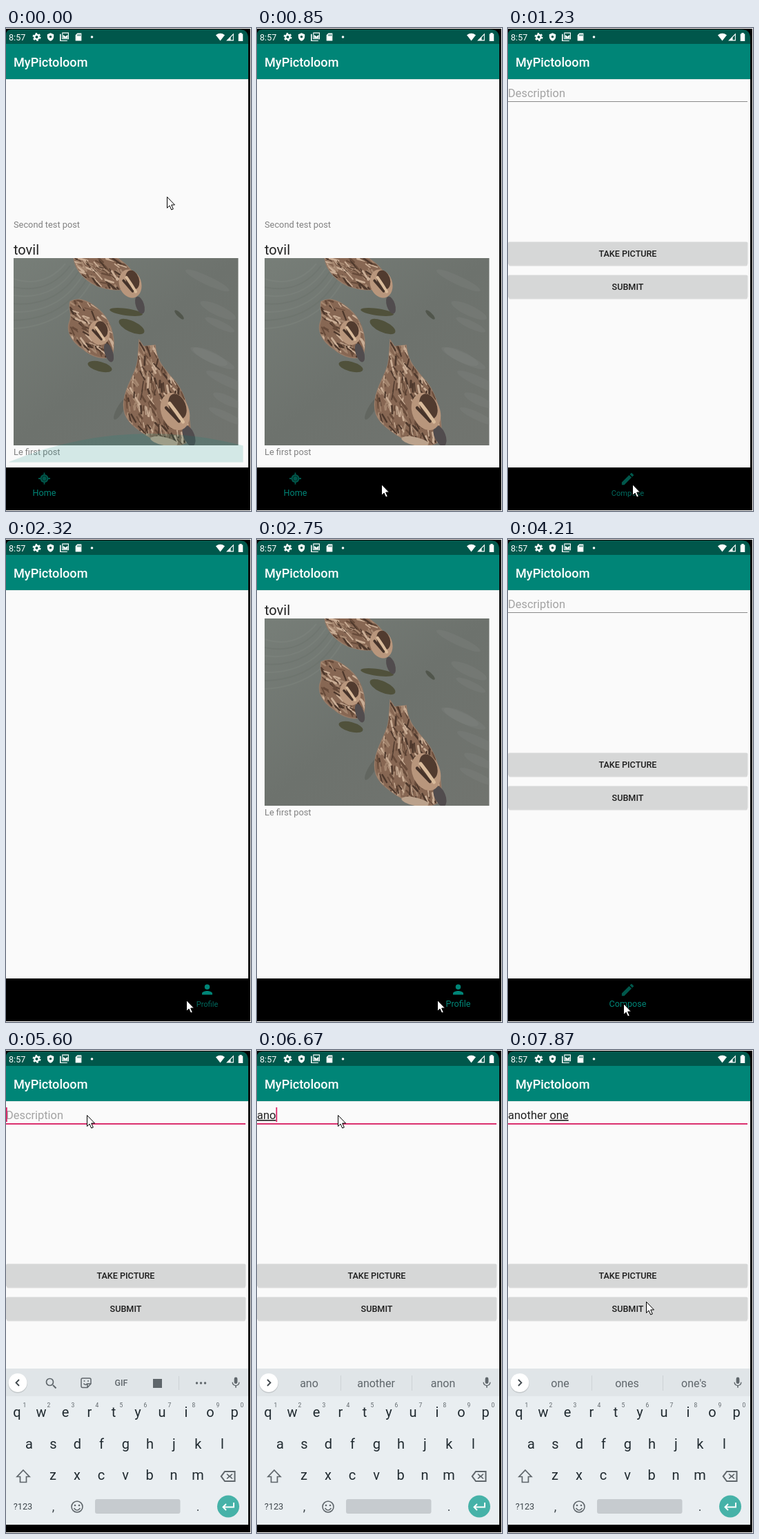
An HTML page that plays this animation: 355 by 699 pixels, repeating every 8 s.

```html
<!DOCTYPE html>
<html lang="en">
<head>
<meta charset="utf-8">
<title>Photo app demo</title>
<style>
html, body { margin: 0; width: 100%; height: 100%; overflow: hidden; background: #fff; }
svg { display: block; width: 100%; height: 100%; }
text { font-family: Roboto, Arial, sans-serif; white-space: pre; }
.mid { text-anchor: middle; }
.med { font-weight: 500; }
.word { text-decoration: underline; text-decoration-thickness: 1px; }
</style>
</head>
<body>
<svg id="stage" viewBox="0 0 355 699" xmlns="http://www.w3.org/2000/svg"></svg>
<script>
const LOOP = 8000, TEAL = '#008577', DARK = '#00574b', PINK = '#d81b60', GREY = '#5f666b';
const stage = document.getElementById('stage');

const text = (s, x, y, size, fill, cls = '', id = '') =>
  `<text id="${id}" class="${cls}" x="${x}" y="${y}" font-size="${size}" fill="${fill}">${s}</text>`;
const rect = (x, y, w, h, fill, more = '') =>
  `<rect x="${x}" y="${y}" width="${w}" height="${h}" fill="${fill}" ${more}/>`;
const oval = (x, y, rx, ry, fill, turn = 0, alpha = 1) =>
  `<ellipse rx="${rx}" ry="${ry}" fill="${fill}" opacity="${alpha}" transform="translate(${x} ${y}) rotate(${turn})"/>`;
const line = (d, color, w = 1, more = '') =>
  `<path d="${d}" fill="none" stroke="${color}" stroke-width="${w}" ${more}/>`;
// Icons are drawn on a 24 unit grid and centred on x, y.
const icon = (d, x, y, size, fill) =>
  `<path d="${d}" fill="${fill}" fill-rule="evenodd" transform="translate(${x - size / 2} ${y - size / 2}) scale(${size / 24})"/>`;
const group = (id, body) => `<g id="${id}">${body}</g>`;

let seed = 7;
const rand = () => (seed = (seed * 16807) % 2147483647) / 2147483647;

const ICONS = {
  shield: 'M12 1L21 5V11C21 17 17 21.500 12 23C7 21.500 3 17 3 11V5ZM12 8A3.500 3.500 0 1 0 12 15A3.500 3.500 0 1 0 12 8Z',
  stack: 'M6 1H24V19H6ZM8 3V17H22V3ZM0 5H3V22H20V24H0ZM9 16V7L15 12L21 7V16Z',
  card: 'M9 2H20V22H4V7ZM9 5V9H11V5ZM12.500 5V9H14.500V5ZM16 5V9H18V5Z',
  wifi: 'M0 7Q12-2 24 7L12 22Z',
  signal: 'M2 22L22 2V22ZM14 20H20V7L14 13Z',
  battery: 'M9 1H15V3.500H18V23H6V3.500H9Z',
  pencil: 'M3 17.250V21H6.750L17.800 9.940L14.060 6.190ZM20.700 7.040A1 1 0 0 0 20.700 5.630L18.370 3.290A1 1 0 0 0 16.960 3.290L15.130 5.120L18.880 8.870Z',
  person: 'M12 12A4 4 0 1 0 12 4A4 4 0 1 0 12 12ZM12 14C9.300 14 4 15.300 4 18V20H20V18C20 15.300 14.700 14 12 14Z',
  mic: 'M12 14A3 3 0 0 0 15 11V5A3 3 0 0 0 9 5V11A3 3 0 0 0 12 14ZM17.300 11A5.300 5.300 0 0 1 6.700 11H5A7 7 0 0 0 11 17.700V21H13V17.700A7 7 0 0 0 19 11Z',
  back: 'M7 4H23V20H7L1 12ZM8 6L3.500 12L8 18H21V6ZM11 8L14.500 11L18 8L19 9L16 12L19 15L18 16L14.500 13L11 16L10 15L13 12L10 9Z'
};

function duck(id, body, angle, box, head, bill) {
  const [x, y, w, h] = box;
  let down = '';
  for (let i = 0; i < w * h / 45; i++) {
    const a = (angle + (rand() - .5) * 60) * Math.PI / 180, len = 6 + rand() * 10;
    const px = x + rand() * w, py = y + rand() * h;
    down += line(`M${px.toFixed(1)} ${py.toFixed(1)}l${(Math.cos(a) * len).toFixed(1)} ${(Math.sin(a) * len).toFixed(1)}`,
      ['#4d382c', '#674b3a', '#a58770', '#c9ad95'][i % 4], 1.2 + rand() * 2);
  }
  const [hx, hy, rx, ry, turn] = head;
  return `<clipPath id="${id}"><path d="${body}"/></clipPath>
    <path d="${body}" fill="#876753" stroke="#977b67" stroke-width="1.500"/>
    <g clip-path="url(#${id})" stroke-linecap="round">${down}</g>
    ${oval(...bill.slice(0, 4), '#514c4e', bill[4])}
    <g transform="translate(${hx} ${hy}) rotate(${turn})" stroke-linecap="round">
      ${oval(0, 0, rx, ry, '#b8967c')}
      ${oval(rx * .3, -ry * .2, rx * .6, ry * .68, '#513b2f')}
      ${line(`M${-rx * .15} ${-ry * .5}Q${rx * .1} ${ry * .1} ${rx * .25} ${ry * .65}`, '#d9bb9b', rx * .25)}
      ${line(`M${-rx * .5} ${-ry * .35}Q${-rx * .25} ${ry * .1} 0 ${ry * .55}`, '#45332a', rx * .22)}
    </g>`;
}

function photo() {
  let water = '';
  for (let i = 0; i < 7; i++) {
    water += line(`M0 ${30 + i * 12}Q${45 + i * 6} ${44 + i * 9} ${75 + i * 7} ${8 + i * 3}`, i % 2 ? '#646a65' : '#858b86', 2, 'opacity=".3"');
  }
  for (let i = 0; i < 9; i++) {
    water += oval(190 + rand() * 130, 20 + rand() * 230, 20 + rand() * 22, 4 + rand() * 5, '#858783', 25, .25);
  }
  return `<linearGradient id="pond" x2="1" y2="1"><stop stop-color="#777e78"/><stop offset=".5" stop-color="#6d726d"/><stop offset="1" stop-color="#71746f"/></linearGradient>
    <clipPath id="frame">${rect(0, 0, 325.5, 271, '#000')}</clipPath>
    <g clip-path="url(#frame)">${rect(0, 0, 326, 271, 'url(#pond)')}${water}
    ${oval(163, 78, 24, 5, '#50513b', 8)}${oval(171, 99, 20, 8, '#50513b', 25)}${oval(125, 157, 18, 7, '#50513b', 15)}
    ${oval(240, 82, 9, 3, '#51564c', 45)}${oval(155, 218, 5, 18, '#626660', 30)}
    ${duck('d1', 'M87-2C88 17 107 38 130 43C148 48 169 47 174 35C178 20 160 6 147-2Z', 35, [80, -6, 92, 50], [169, 37, 16, 21, -18], [183, 68, 6, 13, -18])}
    ${duck('d2', 'M82 63C97 55 114 65 128 79C144 96 148 122 143 140C132 149 113 143 100 131C84 121 76 105 81 92C86 82 79 72 82 63Z', 45, [75, 56, 70, 88], [124, 108, 15, 18, -18], [138, 137, 6, 14, -18])}
    ${duck('d3', 'M182 119L188 128L205 126C207 148 216 158 229 173C246 190 257 216 256 262C239 280 210 268 192 256C174 244 156 232 160 206C163 182 178 168 180 147Z', 75, [155, 116, 102, 150], [234, 222, 20, 28, -22], [254, 257, 8, 16, -22])}
    ${oval(218, 265, 20, 6, '#bba28c', 12)}</g>`;
}

const button = (label, y) =>
  rect(1, y + 1.5, 346, 33.5, '#000', 'rx="2" opacity=".13"') + rect(0, y, 347.5, 33, '#d6d7d7', 'rx="2"') +
  text(label, 173.5, y + 21.5, 12.6, '#1c1c1c', 'mid med');

function keyboard() {
  let keys = '';
  const row = (letters, x, y) => [...letters].forEach((c, i) => {
    keys += text(c, x + i * 35, y, 20, '#202a30', 'mid');
  });
  row('qwertyuiop', 16, 531);
  row('asdfghjkl', 33.4, 577);
  row('zxcvbnm', 68, 622);
  [...'1234567890'].forEach((c, i) => { keys += text(c, 27 + i * 35, 517, 8.5, GREY, 'mid'); });
  const tools = line('M68 485L72.500 489.500', GREY, 2) + `<circle cx="63.500" cy="480.500" r="5" fill="none" stroke="${GREY}" stroke-width="1.700"/>` +
    line('M111 475H121Q123 475 123 477V483L118 488.500H111Q109 488.500 109 486.500V477Q109 475 111 475ZM123 483H118V488.500M112.500 482.500Q115 486 117.500 483', GREY, 1.5) +
    `<circle cx="113.500" cy="479" r="1" fill="${GREY}"/><circle cx="119" cy="479" r="1" fill="${GREY}"/>` +
    text('GIF', 167, 486, 12.5, GREY, 'mid med') + rect(213, 476, 13, 13, GREY) + rect(250, 472, 1, 20, '#cdd2d5') +
    [276.5, 282.5, 288.5].map(x => `<circle cx="${x}" cy="482" r="1.700" fill="${GREY}"/>`).join('');
  const words = rect(121, 471, 1, 22, '#cdd2d5') + rect(224, 471, 1, 22, '#cdd2d5') +
    [75.5, 172.5, 269.5].map((x, i) => text('', x, 488, 16, GREY, 'mid', 'hint' + i)).join('');
  return rect(0, 461, 351, 226, '#e9eef1') + rect(0, 461, 351, 40, '#e0e5e8') +
    '<circle cx="17" cy="482.500" r="14" opacity=".12"/><circle cx="17" cy="481.500" r="13.500" fill="#fff"/>' +
    line('', '#3f474c', 1.8, 'id="chevron"') + group('tools', tools) + group('words', words) + icon(ICONS.mic, 333, 481.5, 19, GREY) + keys +
    line('M25 608L34 617.500H29.500V625.500H20.500V617.500H16Z', GREY, 1.7) + icon(ICONS.back, 321.5, 617, 24, GREY) +
    text('?123', 24.5, 665, 12.8, '#3f474c', 'mid') + text(',', 68.5, 667, 18, '#3f474c', 'mid') + text('.', 278, 667, 18, '#3f474c', 'mid') +
    `<circle cx="103" cy="661" r="8" fill="none" stroke="${GREY}" stroke-width="1.600"/><circle cx="100" cy="659" r="1.300" fill="${GREY}"/><circle cx="106" cy="659" r="1.300" fill="${GREY}"/>` +
    line('M98.500 663Q103 669 107.500 663', GREY, 1.5) + rect(129, 650, 123.5, 21, '#c6cbcf', 'rx="3"') +
    '<circle cx="322" cy="660.500" r="16" fill="#46b2a8"/>' + line('M330 655V661.500H315M319 657L314.500 661.500L319 666', '#fff', 1.9);
}

const statusBar = rect(0, 2, 351, 21, DARK) + text('8:57', 4, 17.5, 12.6, '#fff') +
  '<circle cx="44.500" cy="13" r="3.200" fill="none" stroke="#fff" stroke-width="2.400"/>' +
  '<circle cx="44.500" cy="13" r="5" fill="none" stroke="#fff" stroke-width="2" stroke-dasharray="2.600 2.636"/>' +
  icon(ICONS.shield, 64.5, 13, 12.5, '#fff') + icon(ICONS.stack, 84.5, 12.5, 13, '#fff') + icon(ICONS.card, 105, 13, 13, '#fff') +
  '<circle cx="124.500" cy="13" r="1.800" fill="#fff"/>' +
  icon(ICONS.wifi, 310.5, 13, 13, '#fff') + icon(ICONS.signal, 324.5, 13, 13, '#fff') + icon(ICONS.battery, 340, 13, 13, '#fff');

const compass = `<circle cx="55.500" cy="652" r="6" fill="${DARK}"/>` +
  line('M55.500 643.500V660.500M47 652H64', DARK, 1.8) +
  '<circle cx="55.500" cy="652" r="3.500" fill="none" stroke="#002b25"/>';
const label = (s, x) => text(s, x, 677, 12.6, TEAL, 'mid', 'label' + s);

stage.innerHTML = rect(0, 0, 355, 699, '#fff') + rect(0, 1, 354, 697, '#000') +
  `<clipPath id="screen"><path d="M0 10Q0 2 8 2H338Q351 2 351 15V687H0Z"/></clipPath>
  <clipPath id="list">${rect(4, 560, 339.5, 68.5, '#000')}</clipPath>
  <g clip-path="url(#screen)">${rect(0, 73, 351, 563, '#fafafa')}` +
  group('post', text('Second test post', 11, -38.5, 12.8, '#808080', '', 'second') + text('tovil', 11, 1, 20, '#222') +
    `<g transform="translate(11 6)">${photo()}</g>` + text('Le first post', 11, 291, 12.8, '#808080')) +
  `<g clip-path="url(#list)"><circle id="glow" cx="209" r="530" fill="${TEAL}"/></g>` +
  group('compose', text('Description', 0, 100, 16.4, '#a3a3a3', '', 'empty') +
    '<text x="0" y="100" font-size="16.5" fill="#222"><tspan id="done"></tspan><tspan id="word" class="word"></tspan></text>' +
    rect(0, 106, 347, 1, '#8a8a8a', 'id="rule"') + rect(0, 83, 1.7, 21, PINK, 'id="caret"') +
    button('TAKE PICTURE', 309.5) + button('SUBMIT', 357.5)) +
  rect(0, 74, 351, 1, '#000', 'opacity=".06"') + rect(0, 23, 351, 51, TEAL) + statusBar +
  text('MyPictoloom', 11, 56, 18.1, '#fff', 'med') +
  group('navHome', compass + label('Home', 55.5)) +
  group('navCompose', icon(ICONS.pencil, 173.5, 652.5, 23, DARK) + label('Compose', 173.5)) +
  group('navProfile', icon(ICONS.person, 291.5, 652, 22.5, TEAL) + label('Profile', 291.5)) +
  group('keys', keyboard()) + '</g>' +
  '<path id="cursor" d="M.500 .500V16.500L4 13L6.700 19L9.300 18L6.700 12H11.500Z" fill="#fff" stroke="#000"/>';

const $ = id => document.getElementById(id);
const set = (id, attrs) => { for (const k in attrs) $(id).setAttribute(k, attrs[k]); };
const show = (id, on) => { $(id).style.display = on ? '' : 'none'; };
const put = (id, s) => { if ($(id).textContent !== s) $(id).textContent = s; };

// Share of a move done at time t when it happens in n jumps from a to b.
const jumps = (t, a, b, n) => t < a ? 0 : t >= b ? 1 : (Math.floor((t - a) / (b - a) * (n - 1) + 1e-6) + 1) / n;

// start, end, jumps, target, optional control point
const MOVES = [
  [130, 850, 6, [180, 660]],
  [1750, 2030, 3, [261, 667]],
  [3020, 3410, 4, [222, 305]],
  [3540, 3930, 4, [173, 670]],
  [4210, 4210, 1, [167, 672]],
  [4343, 5007, 6, [117, 94]],
  [7630, 7870, 3, [200, 364], [264, 210]]
];
function pointer(t) {
  let p = [233, 244];
  for (const [a, b, n, to, via] of MOVES) {
    if (t < a) break;
    const k = jumps(t, a, b, n), j = 1 - k;
    p = p.map((v, i) => via ? j * j * v + 2 * j * k * via[i] + k * k * to[i] : v + (to[i] - v) * k);
  }
  return p;
}

const TYPED = [
  [6130, 'a', 'a', 'and', 'at'], [6400, 'an', 'an', 'and', 'any'], [6540, 'ano', 'ano', 'another', 'anon'],
  [6680, 'anoth', 'anoth', 'another', 'other'], [6810, 'anothe', 'anothe', 'another', 'other'],
  [6950, 'another', 'another', 'others', "other's"], [7090, 'another o', 'o', 'one', 'of'],
  [7230, 'another one', 'one', 'ones', "one's"]
];

function draw(t) {
  const page = t < 1230 ? 'Home' : t < 2320 ? 'Compose' : t < 4210 ? 'Profile' : 'Compose';
  for (const p of ['Home', 'Compose', 'Profile']) show('nav' + p, p === page);
  show('compose', page === 'Compose');
  show('post', page === 'Home' || page === 'Profile' && t >= 2750);
  show('second', page === 'Home');
  set('post', { transform: `translate(0 ${page === 'Home' ? 327 : 109})` });
  const growC = t >= 1230 && t < 1350, growP = t >= 2320 && t < 2460;
  set('labelCompose', { 'font-size': growC ? 11.1 : 12.6, opacity: growC ? .8 : 1 });
  set('labelProfile', { 'font-size': growP ? 11.1 : 12.6, opacity: growP ? .8 : 1 });

  const glow = page === 'Home' ? 1 - jumps(t, 130, 706, 5)
    : page === 'Profile' ? jumps(t, 3280, 3410, 2) - jumps(t, 3540, 3930, 4) : 0;
  set('glow', { cy: 1158 - 41 * glow, opacity: .155 * Math.sqrt(Math.max(0, glow)) });

  const entry = TYPED.filter(e => e[0] <= t).pop();
  const str = entry ? entry[1] : '', cut = str.lastIndexOf(' ') + 1;
  show('empty', !entry);
  put('done', str.slice(0, cut));
  put('word', str.slice(cut));
  const focus = t >= 5140;
  set('rule', { fill: focus ? PINK : '#8a8a8a', height: focus ? 1.8 : 1 });
  show('caret', t >= 5300 && t < 5720 || t >= 6130 && t < 7630);
  const end = entry && page === 'Compose' ? $('done').getComputedTextLength() + $('word').getComputedTextLength() : 0;
  set('caret', { x: end });

  show('keys', t >= 5600);
  show('tools', !entry);
  show('words', !!entry);
  set('chevron', { d: entry ? 'M15 477L19.500 481.500L15 486' : 'M19 477L14.500 481.500L19 486' });
  for (let i = 0; i < 3; i++) put('hint' + i, entry ? entry[i + 2] : '');

  const [x, y] = pointer(t);
  set('cursor', { transform: `translate(${Math.round(x)} ${Math.round(y)})` });
}

const start = performance.now();
function tick() {
  draw((performance.now() - start) % LOOP);
  requestAnimationFrame(tick);
}
tick();
</script>
</body>
</html>
```
